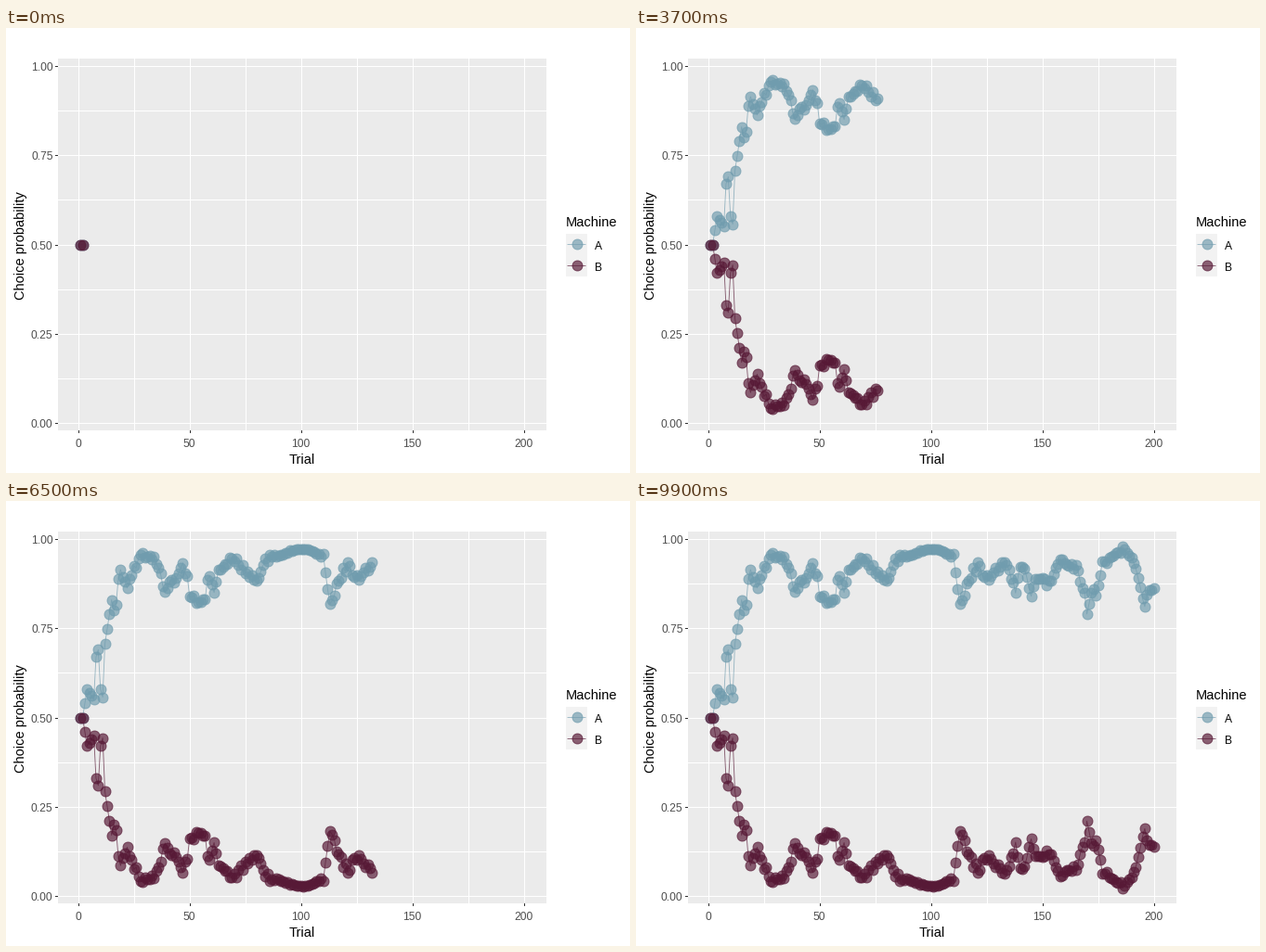
Recreate the animation shown at these times as a matplotlib script. Size 672 by 480 pixels, loop 10 s.

```python
import numpy as np
import matplotlib.pyplot as plt
from matplotlib.animation import FuncAnimation
from matplotlib.patches import Rectangle

W, H, DPI = 672, 480, 96
PX = 72 / DPI
FRAMES, STEP = 100, 2
LEFT, RIGHT, TOP, BOTTOM = 56, 582, 33, 434
BLUE, WINE = "#709cae", "#571936"
ALPHA = 0.68
RADIUS = 5.5

plt.rcParams["font.family"] = "Liberation Sans"

# Turning points of the learning curve: (trial, probability of choosing A)
TURNS = [
    (2, .50), (4, .58), (7, .55), (8, .67), (9, .69), (10, .58), (11, .557),
    (12, .707), (15, .83), (16, .80), (19, .917), (22, .87), (28, .96),
    (34, .947), (39, .86), (43, .884), (47, .935), (50, .845), (56, .82),
    (59, .90), (61, .84), (63, .907), (69, .95), (76, .90), (81, .90),
    (86, .953), (101, .973), (110, .953), (113, .81), (119, .917),
    (122, .927), (124, .87), (133, .935), (138, .875), (141, .93),
    (145, .84), (147, .895), (153, .875), (158, .945), (167, .905),
    (170, .79), (172, .86), (174, .83), (177, .928), (186, .975),
    (191, .94), (196, .82), (200, .863),
]


def choice_probability(trials):
    """Path through the turning points, with trial noise once learning settles."""
    p = np.interp(trials, *zip(*TURNS))
    noise = np.random.default_rng(4).normal(0, 0.09, len(trials))
    return p + noise * p * (1 - p) * (trials > 16)


def px_x(trial):
    return 77.75 + 2.3988 * trial


def px_y(prob):
    return 233.6 - 385 * (prob - 0.5)


fig = plt.figure(figsize=(W / DPI, H / DPI), dpi=DPI, facecolor="white")
ax = fig.add_axes([0, 0, 1, 1])
ax.set(xlim=(0, W), ylim=(H, 0))
ax.axis("off")


def box(x0, y0, x1, y1, color):
    ax.add_patch(Rectangle((x0, y0), x1 - x0, y1 - y0, fc=color, lw=0, zorder=0))


def rule(xs, ys, color):
    ax.plot(xs, ys, color=color, lw=PX, solid_capstyle="butt", snap=False,
            zorder=1)


def label(x, y, text, size, color="black", ha="center", **kw):
    ax.text(x, y, text, fontsize=size, color=color, ha=ha, **kw)


def series(color):
    line, = ax.plot([], [], color=color, alpha=ALPHA, lw=0.9 * PX, snap=False,
                    zorder=2)
    dots = ax.scatter([], [], s=(2 * RADIUS * PX) ** 2, fc=color, ec=color,
                      alpha=ALPHA, lw=PX, zorder=3)
    return line, dots


def fill(parts, xs, ys):
    line, dots = parts
    line.set_data(xs, ys)
    dots.set_offsets(np.column_stack([xs, ys]))


# Panel, grid and axes
box(LEFT, TOP, RIGHT, BOTTOM, "#ebebeb")
for t in range(0, 201, 25):
    x = round(px_x(t)) + 0.5
    rule([x, x], [TOP, BOTTOM], "white")
    if t % 50 == 0:
        rule([x, x], [BOTTOM, BOTTOM + 3], "#333333")
        label(x - 0.8, 452, str(t), 9, "#4d4d4d")
for k in range(9):
    y = round(px_y(k / 8)) + 0.5
    rule([LEFT, RIGHT], [y, y], "white")
    if k % 2 == 0:
        rule([LEFT - 3, LEFT], [y, y], "#333333")
        label(50.5, y + 4.5, f"{k / 8:.2f}", 9, "#4d4d4d", "right")
label(319, 470, "Trial", 11)
label(20, 234.5, "Choice probability", 11, rotation=90,
      rotation_mode="anchor", va="baseline")

# Legend
label(602.5, 214, "Machine", 11, ha="left")
box(603, 222, 626, 268, "#f2f2f2")
for name, color, y in (("A", BLUE, 233), ("B", WINE, 256)):
    key_line, key_dot = series(color)
    key_line.set_data([605, 624], [y + 0.5, y + 0.5])
    key_dot.set_offsets([[615, y]])
    label(634, y + 5.8, name, 9, ha="left")

trials = np.arange(1, FRAMES * STEP + 1)
prob_a = choice_probability(trials)
xs, ya, yb = px_x(trials), px_y(prob_a), px_y(1 - prob_a)
curve_a, curve_b = series(BLUE), series(WINE)


def draw(frame):
    n = STEP * (frame + 1)
    fill(curve_a, xs[:n], ya[:n])
    fill(curve_b, xs[:n], yb[:n])
    return (*curve_a, *curve_b)


anim = FuncAnimation(fig, draw, frames=FRAMES, interval=100, repeat=True,
                     repeat_delay=0, blit=False)
plt.show()
```
